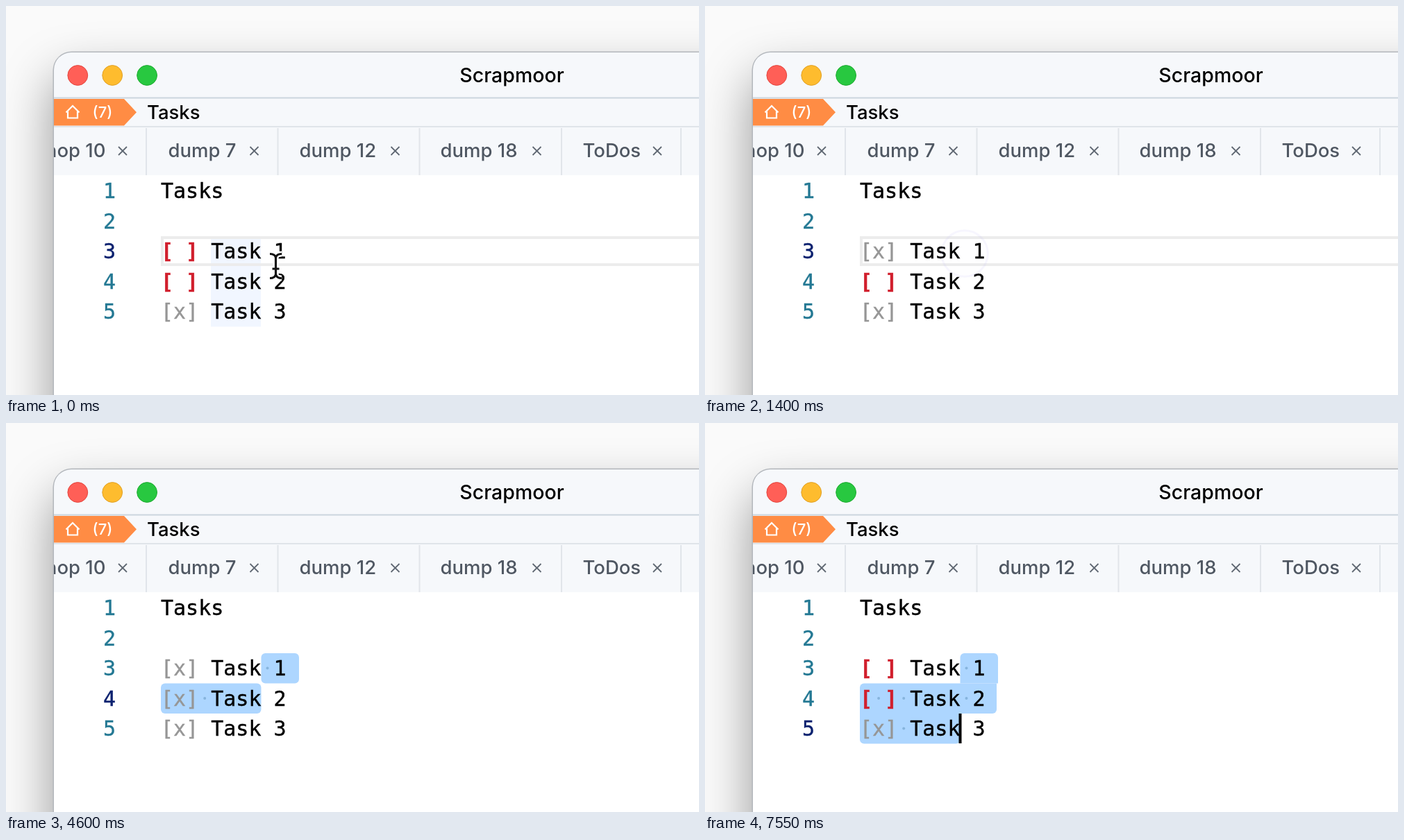
An HTML page with a canvas for the animation above (7.7 s loop, 998 by 561 pixels).

```html
<!DOCTYPE html>
<html lang="en">
<head>
<meta charset="utf-8">
<title>Task list</title>
<style>
html, body { margin: 0; width: 100%; height: 100%; overflow: hidden; background: #fafafa; }
canvas { display: block; }
</style>
</head>
<body>
<canvas id="stage" width="998" height="561"></canvas>
<script>
const ctx = document.getElementById('stage').getContext('2d');
const LOOP = 7700, TICK = 50;
const COL = 18.06, LEFT = 223, ROW = 43.5;
const SANS = 'Inter, "Open Sans", sans-serif';
const MONO = '30px "DejaVu Sans Mono", monospace';
const BAR = '#f6f8fb';

// Marks of the three tasks from each time on
const marks = [[0, '  x'], [1350, 'x x'], [2250, '  x'], [4400, 'xxx'],
  [5000, '  x'], [6200, 'xx '], [7050, '  x']];
const caretOn = [[600, 1100], [1600, 2100], [2600, 3600], [4100, 4600],
  [5100, 5950], [6450, 6950], [7450, LOOP]];
// Pointer: time, x, y
const path = [[0, 388.5, 375], [400, 388.5, 375], [700, 374, 357], [800, 374, 357],
  [850, 388.5, 370], [1300, 806, 319]];

const rowTop = n => 245 + (n - 1) * ROW;
const colX = c => LEFT + c * COL;
const clamp = v => Math.max(0, Math.min(1, v));

function rect(x, y, w, h, color, radii = 0) {
  ctx.fillStyle = color;
  ctx.beginPath();
  ctx.roundRect(x, y, w, h, radii);
  ctx.fill();
}

function text(str, x, y, font, color, align = 'left') {
  ctx.font = font;
  ctx.fillStyle = color;
  ctx.textAlign = align;
  ctx.fillText(str, x, y);
}

const label = (str, x, y, size, color, align) =>
  text(str, x, y, `500 ${size}px ${SANS}`, color, align);

// Code text, slightly thickened
function code(str, x, y, color, weight = '') {
  text(str, x, y, weight + MONO, color);
  ctx.strokeStyle = color;
  ctx.lineWidth = .4;
  ctx.strokeText(str, x, y);
}

function line(points, color, width) {
  ctx.beginPath();
  points.forEach(([x, y]) => ctx.lineTo(x, y));
  ctx.strokeStyle = color;
  ctx.lineWidth = width;
  ctx.stroke();
}

function disc(x, y, r, fill, stroke, width) {
  ctx.beginPath();
  ctx.arc(x, y, r, 0, 7);
  ctx.fillStyle = fill;
  ctx.fill();
  if (!stroke) return;
  ctx.strokeStyle = stroke;
  ctx.lineWidth = width;
  ctx.stroke();
}

function drawWindow() {
  rect(0, 0, 998, 561, '#fafafa');
  ctx.save();
  ctx.shadowColor = 'rgba(0,0,0,.4)';
  ctx.shadowBlur = 72;
  ctx.shadowOffsetY = 36;
  rect(68, 66, 1200, 700, '#fff', 26);
  ctx.restore();
  rect(67.5, 65.5, 1201, 701, '#b3b7bc', 27);
  ctx.beginPath();
  ctx.roundRect(69, 67, 1198, 698, 25);
  ctx.clip();
  rect(68, 66, 930, 178, BAR);
  rect(68, 244, 930, 400, '#fff');
}

function drawHeader() {
  [['#ff5f57', '#e2463f'], ['#febc2e', '#e0a028'], ['#28c840', '#1eaa31']]
    .forEach(([fill, edge], i) => disc(103.3 + i * 49.9, 100, 14.4, fill, edge, 1));
  label('Scrapmoor', 728.5, 110, 28.5, '#000', 'center');
  rect(68, 131.5, 930, 2, '#ccd6de');

  ctx.fillStyle = '#ff8c44';
  ctx.beginPath();
  [[68, 134], [170, 134], [188, 153.2], [170, 172.5], [68, 172.5]]
    .forEach(([x, y]) => ctx.lineTo(x, y));
  ctx.fill();
  line([[86.5, 153.5], [96, 144], [105.5, 153.5]], '#fff', 2.2);
  line([[89, 152], [89, 161.5], [103, 161.5], [103, 152]], '#fff', 2.2);
  label('(7)', 139, 160.5, 22, '#fff', 'center');
  label('Tasks', 203, 163, 27.5, '#000');
  rect(68, 173, 930, 2, '#e0e4e9');
}

function drawTabs() {
  const ink = '#4f5762';
  label('shop 10', 143.5, 218, 27.5, ink, 'right');
  [['dump 7', 233.5], ['dump 12', 422.5], ['dump 18', 625.5], ['ToDos', 830.5]]
    .forEach(([name, x]) => label(name, x, 218, 27.5, ink));
  for (const x of [168, 357.5, 560.5, 764.5, 938]) {
    for (const s of [-1, 1]) line([[x - 6, 209 - 6 * s], [x + 6, 209 + 6 * s]], '#606873', 1.8);
  }
  for (const x of [201, 390.5, 594.5, 799, 971]) rect(x, 176, 2, 68, '#e1e5ea');
}

function drawSelection(last, state) {
  const blue = '#add6ff';
  const spans = [[3, 8, 10]];
  rect(colX(8), rowTop(3), 54.5, ROW, blue, last === 5 ? [6, 6, 0, 0] : 6);
  if (last === 5) {
    rect(LEFT, rowTop(4), 197, ROW, blue, [6, 0, 6, 0]);
    spans.push([4, 0, 10]);
  }
  rect(LEFT, rowTop(last), colX(8) - LEFT, ROW, blue, last === 5 ? [0, 0, 6, 6] : 6);
  spans.push([last, 0, 8]);
  for (const [n, from, to] of spans) {
    const chars = `[${state[n - 3]}] Task ${n - 2}`;
    for (let c = from; c < to; c++) {
      if (chars[c] === ' ') disc(colX(c + .5), rowTop(n) + 21.5, 2, '#86b4dd');
    }
  }
}

function drawEditor(t) {
  const state = marks.filter(m => m[0] <= t).pop()[1];
  const active = t < 3150 ? 3 : t < 5500 ? 4 : 5;

  if (t < 1350) rect(295, rowTop(3), 72, 3 * ROW, t < 450 ? '#f1f6ff' : '#e6f1fe');
  if (active === 3) {
    ctx.strokeStyle = '#ececec';
    ctx.lineWidth = 4;
    ctx.strokeRect(225, 334, 900, 39);
  } else drawSelection(active, state);

  for (let n = 1; n <= 5; n++) {
    const y = rowTop(n) + 32;
    code(n, 140, y, n === active ? '#0b216f' : '#237893');
    if (n === 1) code('Tasks', LEFT, y, '#000');
    if (n < 3) continue;
    const mark = state[n - 3];
    if (mark === ' ') code('[ ]', LEFT, y, '#d11f2d', 'bold ');
    else code('[x]', LEFT, y, '#969696');
    code('Task ' + (n - 2), colX(4), y, '#000');
  }
  if (caretOn.some(([a, b]) => t >= a && t < b)) {
    rect(365.5, rowTop(active), 4, ROW - .5, '#000');
  }
}

function drawRing(t) {
  if (t < 500 || t >= 1600) return;
  const p = t < 850 ? clamp((t - 450) / 250) : clamp(1 - (Math.min(t, 1400) - 950) / 500);
  ctx.globalAlpha = p;
  disc(374, 357, 32 + 13 * p, 'rgba(190,175,255,.1)', '#b3a4ee', 3);
  ctx.globalAlpha = 1;
}

function drawPointer(t) {
  if (t >= 1350) return;
  const next = path.findIndex(k => k[0] > t);
  const b = path[next < 0 ? path.length - 1 : next];
  const a = next < 0 ? b : path[next - 1];
  const p = a === b ? 0 : (t - a[0]) / (b[0] - a[0]);
  ctx.save();
  ctx.translate(a[1] + (b[1] - a[1]) * p, a[2] + (b[2] - a[2]) * p);
  ctx.beginPath();
  for (const s of [-1, 1]) {
    ctx.moveTo(-8.5, 17.5 * s);
    ctx.quadraticCurveTo(-1, 17.5 * s, 0, 12 * s);
    ctx.quadraticCurveTo(1, 17.5 * s, 8.5, 17.5 * s);
  }
  ctx.moveTo(0, -13);
  ctx.lineTo(0, 13);
  ctx.moveTo(-5, 4);
  ctx.lineTo(5, 4);
  for (const [color, width] of [['#fff', 8], ['#111', 3.2]]) {
    ctx.strokeStyle = color;
    ctx.lineWidth = width;
    ctx.stroke();
  }
  ctx.restore();
}

const start = performance.now();
function draw() {
  const t = Math.floor((performance.now() - start) % LOOP / TICK) * TICK;
  ctx.save();
  drawWindow();
  drawHeader();
  drawTabs();
  drawEditor(t);
  drawRing(t);
  drawPointer(t);
  ctx.restore();
  requestAnimationFrame(draw);
}
draw();
</script>
</body>
</html>
```
